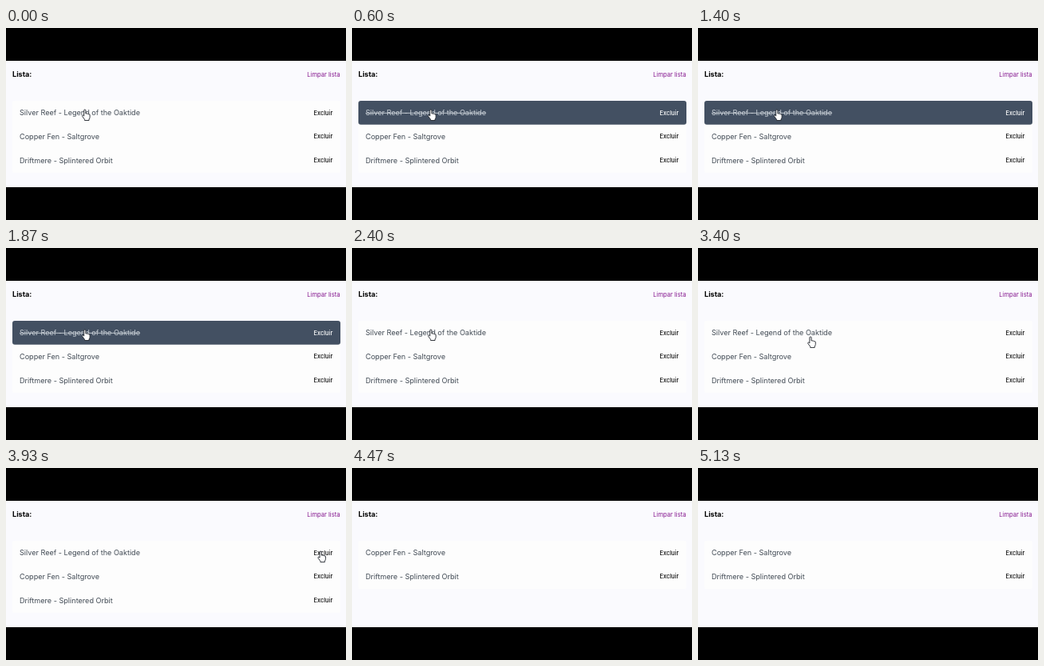
An HTML page for the animation above (5190 ms loop, 426 by 240 pixels).

```html
<!DOCTYPE html>
<html lang="pt">
<head>
<meta charset="utf-8">
<title>Lista</title>
<style>
html, body { margin: 0; width: 100%; height: 100%; overflow: hidden; background: #000; }
svg { display: block; width: 100%; height: 100%; font: 9.1px Inter, sans-serif; }
.item { fill: #424b55; }
.small { font-size: 7.4px; text-anchor: end; fill: #111; }
.done rect { fill: #435062; }
.done .item { fill: #cbd2d9; text-decoration: line-through; }
.done .small { fill: #fff; }
</style>
</head>
<body>
<svg viewBox="0 0 426 240">
  <rect y="41" width="426" height="158" fill="#fafafe"/>
  <text x="8" y="61.3" font-weight="700">Lista:</text>
  <text class="small" x="418.5" y="61" style="font-size:7.6px;fill:#86198f">Limpar lista</text>
  <rect id="panel" x="8" y="91" width="411" rx="3" fill="#fdfdfd"/>
  <g id="rows"></g>
  <path id="hand" fill="#fff" stroke="#20242c" stroke-width=".9" stroke-linejoin="round"
    d="M-1.1 8V.9Q-1 0 0 0T1.1 .9V5Q2.2 4.4 3 5.3Q4 4.8 4.7 5.7Q6.3 5.4 6.3 7V9.4Q6.2 11 5.2 12V13.5H-.3V12.3L-3.2 8.4Q-3.5 7 -2.3 7Z"/>
</svg>
<script>
const LOOP = 5190, ROW = 29.7;
const DONE_FROM = 400, DONE_TO = 1950, DELETE_AT = 4150;
const names = [
  'Silver Reef - Legend of the Oaktide',
  'Copper Fen - Saltgrove',
  'Driftmere - Splintered Orbit'
];
const $ = id => document.getElementById(id);

$('rows').innerHTML = names.map(name => `<g>
  <rect x="8" y="91" width="411" height="${ROW}" rx="3" fill="none"/>
  <text class="item" x="17" y="109.3">${name}</text>
  <text class="small" x="409.3" y="108.7" font-weight="500">Excluir</text></g>`).join('');
const rows = [...$('rows').children];

const ease = (t, from, to) => {
  const p = Math.min(1, Math.max(0, (t - from) / (to - from)));
  return p * p * (3 - 2 * p);
};

function draw(now) {
  const t = now % LOOP;
  const deleted = t >= DELETE_AT ? 1 : 0;
  rows.forEach((row, i) => {
    row.style.display = i < deleted ? 'none' : '';
    row.setAttribute('transform', `translate(0 ${(i - deleted) * ROW})`);
  });
  rows[0].classList.toggle('done', t >= DONE_FROM && t < DONE_TO);
  $('panel').setAttribute('height', (names.length - deleted) * ROW + 1);

  // The pointer sags on its way to the button, then leaves to the right.
  const go = ease(t, 3230, 3950), leave = ease(t, 4180, 4420);
  const x = 98.8 + 296 * go + 45 * leave;
  const y = 102 + 2 * go + 20 * Math.sin(Math.PI * go);
  $('hand').setAttribute('transform', `translate(${x} ${y})`);
  requestAnimationFrame(draw);
}
const start = performance.now();
requestAnimationFrame(now => draw(Math.max(0, now - start)));
</script>
</body>
</html>
```
